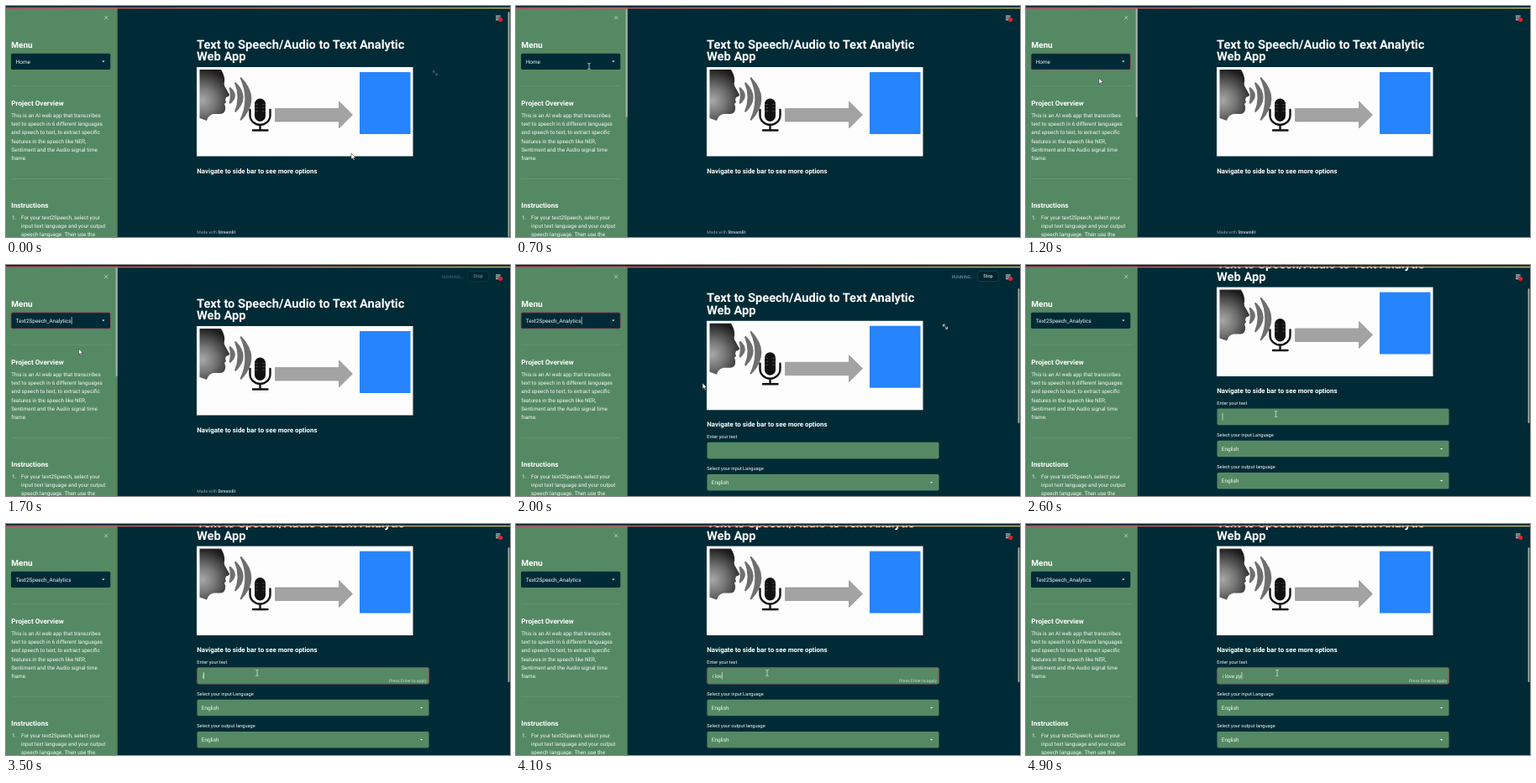
An HTML page that plays this animation: 600x276 px, repeating every 5 s.

```html
<!DOCTYPE html>
<html lang="en">
<head>
<meta charset="utf-8">
<title>Text to Speech Web App</title>
<style>
  html, body { margin: 0; width: 100%; height: 100%; overflow: hidden; background: #002b36; }
  svg { display: block; width: 100vw; height: 100vh; }
  text { font: 6.4px Roboto, "Liberation Sans", sans-serif; fill: #f4f8f6; white-space: pre; text-rendering: geometricPrecision; }
  .h1 { font-size: 14.65px; font-weight: 700; fill: #fff; }
  .h2 { font-size: 10px; font-weight: 700; fill: #fff; }
  .h3 { font-size: 8.2px; font-weight: 700; fill: #fff; }
  .nav { font-size: 7.9px; }
  .label { font-size: 5.6px; }
  .tiny { font-size: 5.1px; }
  .dim { fill: #8fa3a6; }
  .green { fill: #558964; }
  .dark { fill: #002b36; }
  .hr { stroke: #6f9c7b; stroke-width: .6; }
  .caret { stroke: #fff; stroke-width: .6; }
  .ring { fill: none; stroke: #a04a5c; stroke-width: .8; }
  .thumb { fill: #9fb8a8; }
</style>
</head>
<body>
<svg viewBox="0 0 600 276" preserveAspectRatio="none">
  <defs>
    <linearGradient id="bar"><stop stop-color="#cc3c60"/><stop offset=".5" stop-color="#cf7c62"/><stop offset="1" stop-color="#c4b668"/></linearGradient>
    <radialGradient id="skin" gradientUnits="userSpaceOnUse" cx="234" cy="113" r="38"><stop stop-color="#a8a8a8"/><stop offset=".4" stop-color="#777"/><stop offset="1" stop-color="#1c1c1c"/></radialGradient>
    <filter id="soft"><feGaussianBlur stdDeviation=".5"/></filter>
  </defs>
  <rect class="dark" width="600" height="276"/>

  <g id="page">
    <text class="h1" x="227" y="50.7">Text to Speech/Audio to Text Analytic</text>
    <text class="h1" x="227" y="65">Web App</text>
    <g id="art">
      <rect x="227" y="73" width="257.500" height="106.500" fill="#fdfdfd"/>
      <path filter="url(#soft)" fill="url(#skin)" d="M230.500 76H256Q261 84 260 91Q259 94 261 97L266 106Q266 108 262 109L261 112L262 115L260 117L261 120Q262 128.500 255 129H247Q241 130 239 137L230.500 134Z"/>
      <g id="waves" fill="#6e6e6e" filter="url(#soft)"></g>
      <g fill="none" stroke="#111" stroke-width="2.400">
        <rect x="296" y="110.500" width="13" height="27.500" rx="6.500" fill="#111" stroke="none"/>
        <path d="M290.500 124V130.500A12 11.500 0 0 0 314.500 130.500V124M302.500 142V148M294 148.500H311.500" stroke-linecap="round"/>
        <path d="M296 117.500H300M296 121.500H300M296 125.500H300M305 117.500H309M305 121.500H309M305 125.500H309" stroke="#555" stroke-width=".7"/>
      </g>
      <path d="M320.500 122.500H396.500V114L412.500 130L396.500 146V138H320.500Z" fill="#a3a3a3" stroke="#949494" stroke-width=".7"/>
      <rect x="421" y="79" width="60.500" height="74" fill="#2684fc"/>
    </g>
    <path id="expand" d="M508.800 77.800L513.200 82.200M508.500 80V77.500H511M511 82.500H513.500V80" fill="none" stroke="#e6eeee" stroke-width=".8"/>
    <text class="h3 nav" x="227.300" y="199.500">Navigate to side bar to see more options</text>
    <text id="foot" class="tiny dim" x="227.300" y="271.500">Made with <tspan font-weight="700" fill="#b7c4c6">Streamlit</tspan></text>
    <g id="form">
      <text class="label" x="227.300" y="213.300">Enter your text</text>
      <rect class="green" x="227.500" y="218" width="276" height="19.700" rx="1.800"/>
      <rect id="inputRing" class="ring" x="227.700" y="218.200" width="275.600" height="19.300" rx="1.800"/>
      <text id="typed" x="233.500" y="230.200"></text>
      <path id="inputCaret" class="caret" d="M0 223.500V232"/>
      <text id="hint" class="tiny" x="501" y="235.700" text-anchor="end" style="fill:#c3d6c8">Press Enter to apply</text>
      <text class="label" x="227.300" y="251.500">Select your input Language</text>
      <rect class="green" x="227.500" y="256.300" width="276" height="19.500" rx="1.800"/>
      <text x="232.800" y="268.600">English</text>
      <path d="M493 265.400h3.200l-1.600 1.700z" fill="#fff"/>
      <text class="label" x="227.300" y="289.700">Select your output language</text>
      <rect class="green" x="227.500" y="294.500" width="276" height="19.500" rx="1.800"/>
      <text x="232.800" y="306.800">English</text>
      <path d="M493 303.600h3.200l-1.600 1.700z" fill="#fff"/>
    </g>
  </g>
  <rect id="homeThumb" class="thumb" x="597.600" y="7" width="1.800" height="269" rx=".9"/>
  <rect id="formThumb" class="thumb" x="597.600" y="28" width="1.800" height="161" rx=".9"/>

  <rect class="green" width="132.700" height="276"/>
  <rect id="sideThumb" class="thumb" x="130.700" y="3" width="2" height="130" rx="1"/>
  <path d="M117 11.700L121.400 16.100M121.400 11.700L117 16.100" stroke="#b4ccbb" stroke-width=".9"/>
  <text class="h2" x="6.300" y="49.800">Menu</text>
  <rect class="dark" x="6" y="56.800" width="118.300" height="19.300" rx="1.800"/>
  <rect id="menuRing" class="ring" x="6" y="56.800" width="118.300" height="19.300" rx="1.800"/>
  <text id="choice" x="11.800" y="69"></text>
  <path id="menuCaret" class="caret" d="M0 62V71"/>
  <path d="M114.300 65.600h3.200l-1.600 1.700z" fill="#fff"/>
  <path class="hr" d="M6 95.500H125M6 206.500H125"/>
  <text class="h3" x="6.300" y="118.800">Project Overview</text>
  <g id="about"></g>
  <text class="h3" x="6.300" y="241">Instructions</text>
  <text x="7" y="254.700">1.</text>
  <g id="steps"></g>

  <g id="running">
    <text class="tiny dim" x="518.800" y="15.800">RUNNING...</text>
    <rect x="549.800" y="7.300" width="24.500" height="12.300" rx="1.800" fill="#00232d" stroke="#2c4d56" stroke-width=".6"/>
    <text class="label" x="562" y="15.400" text-anchor="middle">Stop</text>
  </g>
  <path d="M583 12H588.600M583 14.200H588.600M583 16.400H588.600" stroke="#f0f4f4" stroke-width="1"/>
  <circle cx="588.700" cy="16.300" r="2.600" fill="#e0202c"/>
  <rect width="600" height="1.700" fill="#04222b"/>
  <rect y="1.700" width="600" height="1.500" fill="url(#bar)"/>

  <path id="arrow" d="M0 0V7.200L1.700 5.700L2.900 8.300L4.100 7.700L2.900 5.300H5.200Z" fill="#fff" stroke="#111" stroke-width=".5"/>
  <path id="beam" d="M-1.800 -3.600Q0 -3.600 0 -2.600Q0 -3.600 1.800 -3.600M0 -2.800V2.800M-1.800 3.600Q0 3.600 0 2.600Q0 3.600 1.800 3.600" fill="none" stroke="#d5dcd8" stroke-width=".8"/>
</svg>
<script>
const LOOP = 5000;
const $ = id => document.getElementById(id);

function lines(id, x, y, rows) {
  $(id).innerHTML = rows.map((row, i) => `<text x="${x}" y="${y + i * 10.2}">${row}</text>`).join('');
}
lines('about', 6.3, 133, [
  'This is an AI web app that transcribes',
  'text to speech in 6 different languages',
  'and speech to text, to extract specific',
  'features in the speech like NER,',
  'Sentiment and the Audio signal time',
  'frame.'
]);
lines('steps', 18, 254.7, [
  'For your text2Speech, select your',
  'input text language and your output',
  'speech language. Then use the'
]);
// crescents that grow away from the mouth
$('waves').innerHTML = [0, 1, 2].map(i => {
  const x = 267 + i * 6.5, half = 10 + i * 8, y = 107 + i * 2 - half;
  const outer = 9 + i * 5, inner = 2 + i * 3.5;
  return `<path d="M${x} ${y}q${outer * 1.3} ${half} 0 ${half * 2}l-1.5 -1q${inner * 1.3} ${1 - half} 0 ${2 - half * 2}z"/>`;
}).join('');

// time, x, y
const path = [
  [0, 411, 176], [100, 411, 176], [600, 87, 72], [1000, 87, 72],
  [1400, 86.500, 100], [1800, 86.500, 100], [2150, 310, 167.500],
  [2300, 310, 167.500], [2500, 297.500, 178], [2900, 297.500, 178], [3100, 299, 178]
];
// time, scroll offset
const scroll = [[0, 0], [1950, 0], [2150, 40], [2200, 40], [2400, 46.500]];
// time at which each further character is in place
const keys = [3400, 3600, 3760, 3920, 4080, 4240, 4420, 4600, 4780];
const phrase = 'i love py';

function at(track, t, k) {
  const i = track.findIndex(p => p[0] > t);
  if (i < 0) return track[track.length - 1][k];
  const a = track[i - 1], b = track[i];
  const u = (t - a[0]) / (b[0] - a[0]);
  return a[k] + (b[k] - a[k]) * u * u * (3 - 2 * u);
}
const within = (t, a, b) => t >= a && t < b;
const show = (id, on) => $(id).setAttribute('opacity', +on);
const move = (id, x, y) => $(id).setAttribute('transform', `translate(${x} ${y})`);
const textWidth = id => $(id).textContent ? $(id).getComputedTextLength() : 0;

function draw(now) {
  const t = Math.floor(now % LOOP / 100) * 100;
  const x = at(path, t, 1), y = at(path, t, 2);
  const beam = within(t, 600, 1100) || t >= 2400;
  move('arrow', x, y);
  move('beam', x, y);
  show('arrow', !beam);
  show('beam', beam);

  move('page', 0, -at(scroll, t, 1));
  const ready = t >= 1900, inSide = x < 133;
  show('form', ready);
  show('foot', !ready);
  show('homeThumb', !ready && !inSide);
  show('formThumb', ready);
  show('sideThumb', inSide);
  show('expand', t < 200 ? .3 : within(t, 2000, 2500));
  show('running', within(t, 1600, 2500) ? Math.min(1, (t - 1500) / 400) : 0);

  $('choice').textContent = t < 1500 ? 'Home' : 'Text2Speech_Analytics';
  show('menuRing', within(t, 900, 2500));
  move('menuCaret', 12.5 + textWidth('choice'), 0);
  show('menuCaret', within(t, 1500, 2500));

  const count = keys.filter(k => k <= t).length;
  $('typed').textContent = phrase.slice(0, count);
  move('inputCaret', 234 + textWidth('typed'), 0);
  show('inputCaret', t >= 2500);
  show('inputRing', t >= 2700);
  show('hint', count > 0);
}
function tick(now) {
  draw(now);
  requestAnimationFrame(tick);
}
draw(0);
requestAnimationFrame(tick);
</script>
</body>
</html>
```
